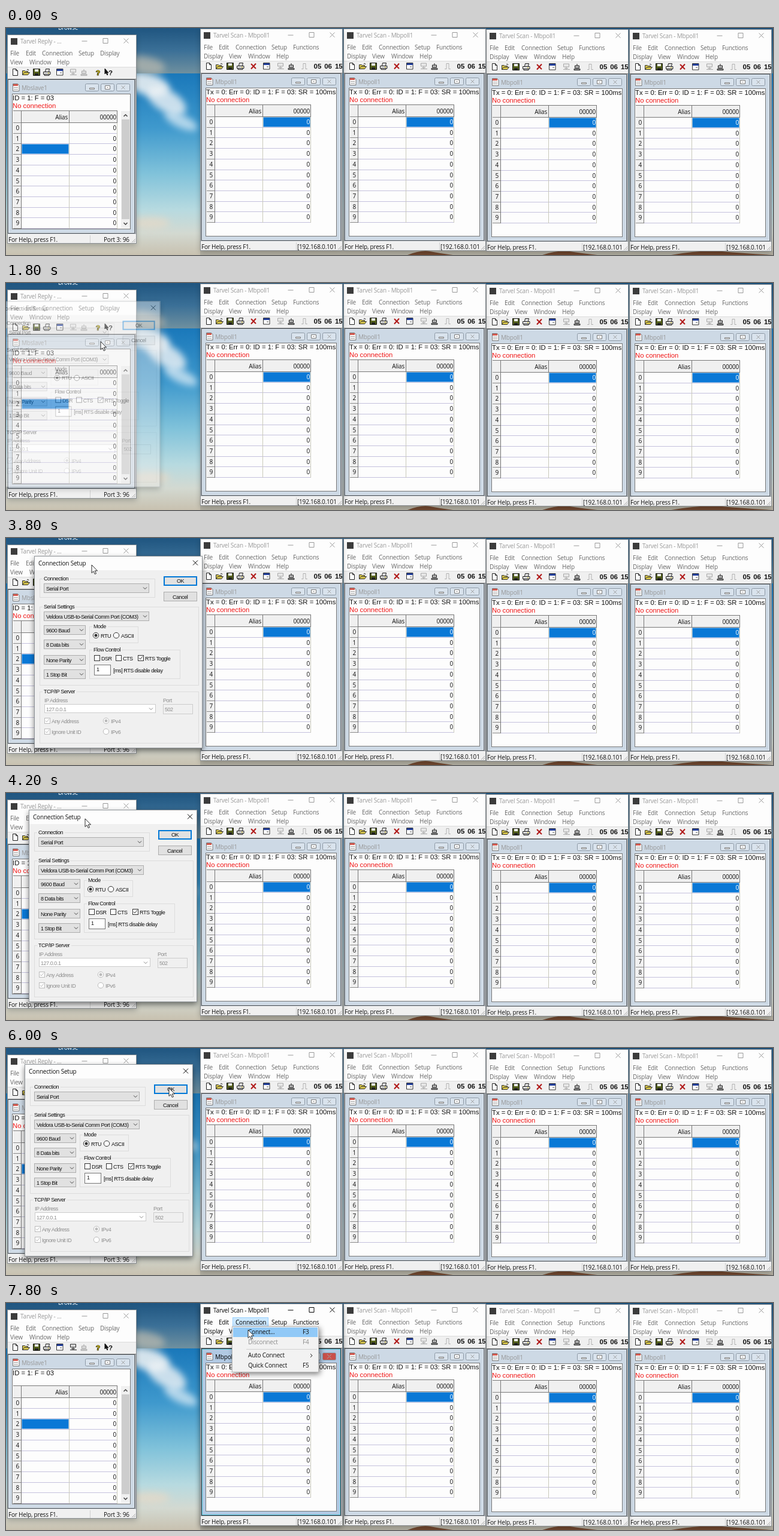
These frames come from a looping animation (1280x380 px, 8000 ms). An HTML page:

```html
<!DOCTYPE html>
<html lang="en">
<head>
<meta charset="utf-8">
<title>Serial connection setup</title>
<style>
  html, body { margin: 0; width: 100%; height: 100%; overflow: hidden; background: #4d7f92; }
  svg { display: block; }
  text { font: 10px "Open Sans", "Noto Sans", sans-serif; letter-spacing: -.2px; fill: #111; white-space: pre; }
  .arial, .red { font: 11.3px "Liberation Sans", Arial, sans-serif; letter-spacing: 0; }
  .red { fill: #f01414; }
  .bold { font: bold 11.5px "Liberation Sans", Arial, sans-serif; letter-spacing: 0; }
  .gold { fill: #d9c200; stroke: #111; stroke-width: 1.2; paint-order: stroke; }
  .dlg { font: 9px "Liberation Sans", Arial, sans-serif; letter-spacing: -.45px; }
  .dim { fill: #8c8c8c; }
  .white { fill: #fff; }
  .end { text-anchor: end; }
  .cap { fill: #999; }
  .bar { fill: #686868; }
  .ctl { stroke: #999; fill: none; }
  .on .cap, .on .bar { fill: #000; }
  .on .ctl { stroke: #000; }
  .shade { filter: blur(5px); opacity: .22; }
  .on > .shade, #dialog > .shade { opacity: .5; }
  .frame { fill: #cdd9e5; stroke: #5d666e; }
  .rim { fill: none; stroke: #e6eef6; }
  .on .frame { fill: #b1c9e3; stroke: #26343f; }
  .on .rim { stroke: #68d5e8; }
  .x { fill: #d9e3ed; }
  .on .x { fill: #c9504a; }
  .off, .net { opacity: .35; }
  .linked .net { opacity: 1; }
  .linked .red { display: none; }
  .combo { fill: #e1e1e1; stroke: #adadad; }
  .hover { fill: #dcecf9; stroke: #6aa9de; }
  .tab { fill: #cce8ff; stroke: #99d1ff; }
</style>
</head>
<body>
<script>
const LOOP = 8000, STEP = 200, PAPER = "#fdfdfd";
const rect = (x, y, w, h, fill, stroke = "none", more = "") =>
  `<rect x="${x}" y="${y}" width="${w}" height="${h}" fill="${fill}" stroke="${stroke}" ${more}/>`;
const box = (x, y, w, h, fill, stroke, more) => rect(x + .5, y + .5, w - 1, h - 1, fill, stroke, more);
const part = (x, y, w, h, cls) =>
  `<rect class="${cls}" x="${x + .5}" y="${y + .5}" width="${w - 1}" height="${h - 1}"/>`;
const path = (d, stroke = "#000", fill = "none", more = "") =>
  `<path d="${d}" stroke="${stroke}" fill="${fill}" ${more}/>`;
const text = (x, y, s, cls = "") => `<text x="${x}" y="${y}" class="${cls}">${s}</text>`;
const group = (x, y, body, more = "") => `<g transform="translate(${x} ${y})" ${more}>${body}</g>`;
const range = n => [...Array(n).keys()];

// Toolbar icons, about 13 by 12 pixels each
const icons = {
  new: path("M1.5.5h5l3 3v8h-8zM6.5.5v3h3", "#222", "#fff"),
  open: path("M.5 10.5v-7h4l1 1h4v2M.5 10.5l3-4h9l-3 4z", "#333", "#d8c64a") + path("M8 2q2-2 3 1", "#222"),
  save: path("M.5.5h11v11h-11z", "#111", "#54601c") + rect(3, 1, 6, 4, "#eee") + rect(3, 8, 6, 3, "#222"),
  print: path("M3.5 5l1-4.5h6l-1 4.5M.5 5.5h11.5v4h-11.5zM2 9.5h8v2h-8z", "#222", "#ddd") + rect(8, 7, 2, 1, "#c8b400"),
  cut: path("M1 2l8 8M9 1.5l-8 9", "#b01818", "none", 'stroke-width="2"'),
  win: path("M.5.5h10.5v10.5h-10.5z", "#333", "#fff") + rect(1, 1, 10, 3, "#24409c") + rect(6, 6, 3, 2, "#aaa"),
  net: path("M1.5 1h9v5h-9zM6 6v4M1 10.5h11M3 8.5h6", "#222", "#ddd"),
  dev: path("M2.5 4h7v4h-7zM6 1v3M1 9.5h10v2h-10z", "#222", "#bbb"),
  pulse: path("M0 10.5h3v-9h4v9h3", "#444"),
  help: text(1, 10.5, "?", "bold gold"),
  what: path("M1 0v9l2-2 2 4 1-1-2-3h3z", "#111", "#111") + text(7, 10.5, "?", "bold"),
};

function grid(x, y, selCol, selRow) {
  const rowY = i => Math.round(y + 21 + i * 17.7);
  let s = rect(x, y, 174, 21, "#f0f0f0") + rect(x, y, 14, 198, "#f0f0f0");
  for (const i of range(11)) {
    const ly = rowY(i) - .5;
    s += path(`M${x + 14} ${ly}h160`, i ? "#c4c1dd" : "#777") + path(`M${x} ${ly}h14`, "#8a8a8a");
  }
  s += path(`M${x + 93.5} ${y}v198M${x + 173.5} ${y}v198`, "#c9c9bb");
  s += path(`M${x + 13.5} ${y}v198M${x} ${y + .5}h174M${x + 93.5} ${y}v21M${x + 173.5} ${y}v21`, "#777");
  s += box(x + 14 + selCol * 80, rowY(selRow), 79, 17, "#0a78d6", "#8ebfe8", 'stroke-dasharray="1"');
  s += text(x + 91, y + 15, "Alias", "end") + text(x + 172, y + 15, "00000", "end");
  for (const i of range(10)) {
    const ty = y + 33 + i * 17.7;
    s += text(x + 4.5, ty, i) + text(x + 172, ty, 0, selCol && i === selRow ? "end white" : "end");
  }
  return s;
}

function child(w, h, title, info, sel) {
  const btn = (x, cls, mark) => `<rect x="${x + .5}" y="6.5" width="22" height="12" rx="2" class="${cls}" fill="#d9e3ed" stroke="#8d99a5"/>` +
    path(mark, cls ? "#fff" : "#777", cls ? "none" : "#fff", `transform="translate(${x + 11.5} 12.5)"`);
  return part(0, -1, w, h + 1, "frame") + part(1, 0, w - 2, h - 1, "rim") +
    path("M8.5 6.5h8l2.5 2.5v9.5h-10.5z", "#777", "#fff") + rect(9, 7, 8, 3, "#d65a50") + path("M10 12.5h7M10 15.5h7", "#999") +
    text(23, 17, title, "cap") +
    btn(w - 83, "", "M-4 1h8v2h-8z") + btn(w - 57, "", "M-4-3h8v6h-8zM-1 0h2") +
    btn(w - 31, "x", "M-3-3l6 6M3-3l-6 6") + path(`M${w - 22.5} 9.5l6 6m0-6l-6 6`, "#666", "none", 'opacity=".6"') +
    box(7, 23, w - 14, h - 30, PAPER, "#777") +
    text(8, 34, info, "arial") + text(8, 47, "No connection", "red") +
    `<svg x="8" y="24" width="${w - 16}" height="${h - 32}">${grid(1, 27, ...sel)}</svg>`;
}

function appWindow(o) {
  const { x, y, w, h } = o, cy = h - 16;
  const ctl = (cx, d) => `<path class="ctl" d="${d}" transform="translate(${cx} 10.5)"/>`;
  const body = rect(0, 0, w, h, "#f0f0f0") + rect(0, 0, w, 54, PAPER) +
    rect(6, 6, 11, 11, "#3c3c3c") + text(22, 15, o.title, "cap") +
    ctl(w - 87, "M-4.5.5h9") + ctl(w - 52, "M-4-4h8v8h-8z") + ctl(w - 17.5, "M-4-4l8 8M4-4l-8 8") +
    `<rect class="tab" x="${o.menu[2][0] - 4.5}" y="23.5" width="59" height="15" visibility="hidden"/>` +
    o.menu.map(([mx, s], i) => text(mx, i < 5 ? 34.5 : 49.5, s, "bar")).join("") +
    path(`M0 54.5h${w}`, "#dcdcdc") +
    o.tools.map(([tx, k, c = k]) => group(tx, 57, icons[k], `class="${c}"`)).join("") +
    rect(0, 74, w, cy - 74, "#a4a8ac") + path(`M0 74.5h${w}`, "#777") +
    group(o.inset, 76, child(...o.child)) + o.extra +
    rect(0, cy, w, 16, "#f0f0f0") + path(`M0 ${cy + .5}h${w}`, "#fafafa") +
    text(2, h - 3, "For Help, press F1.") + path(`M${w - 77.5} ${cy + 2}v13`, "#d0d0d0") +
    text(w - o.portGap, h - 3, o.port) +
    path(`M${w - 8} ${h - 2}l6-6M${w - 5} ${h - 2}l3-3`, "#aaa") + box(0, 0, w, h, "none", "#8b9094");
  return `<g id="${o.id}"><rect class="shade" x="${x}" y="${y + 3}" width="${w}" height="${h}"/>` +
    `<svg x="${x}" y="${y}" width="${w}" height="${h}">${body}</svg></g>`;
}

const poll = i => appWindow({
  id: "poll" + i, x: Math.round(324 + i * 238.6), y: i < 2 ? 1 : 2, w: 238, h: 372,
  title: "Tarvel Scan - Mbpoll1", inset: 2, port: "[192.168.0.101", portGap: 76,
  menu: [[6, "File"], [31, "Edit"], [59, "Connection"], [119, "Setup"], [155, "Functions"],
    [6, "Display"], [48, "View"], [80, "Window"], [127, "Help"]],
  tools: [[9, "new"], [26, "open"], [44, "save"], [61, "print"], [84, "cut"], [105, "win"],
    [128, "net"], [146, "dev"], [169, "pulse", "off"]],
  extra: ["05", "06", "15"].map((s, k) => text(189.5 + k * 17.7, 67, s, "bold")).join(""),
  child: [233, 279, "Mbpoll1", "Tx = 0: Err = 0: ID = 1: F = 03: SR = 100ms", [1, 0]],
});

const scrollbar = rect(0, 0, 15, 196, "#f0f0f0") + rect(1, 14, 13, 167, "#cdcdcd") +
  path("M4.5 9l3-3 3 3M4.5 187l3 3 3-3", "#444", "none", 'stroke-width="1.5"');
const slave = appWindow({
  id: "slave", x: 2, y: 11, w: 216, h: 350,
  title: "Tarvel Reply - ...", inset: 1, port: "Port 3: 96", portGap: 55,
  menu: [[5, "File"], [31, "Edit"], [58, "Connection"], [119, "Setup"], [155, "Display"],
    [5, "View"], [37, "Window"], [83, "Help"]],
  tools: [[8, "new"], [25, "open"], [43, "save"], [60, "print"], [82, "win"], [104, "net"],
    [122, "dev", "off"], [147, "help"], [162, "what"]],
  extra: group(190, 128, scrollbar),
  child: [212, 257, "Mbslave1", "ID = 1: F = 03", [0, 2]],
});

const menu = (id, x, y) => group(x, y,
  '<rect class="shade" x="3" y="3" width="144" height="77" style="opacity:.5"/>' +
  box(0, 0, 145, 77, "#f2f2f2", "#bbb") + `<rect class="pick" x="2" y="2" width="141" height="16" fill="#91c9f7"/>` +
  [["Connect...", "F3", 13], ["Disconnect", "F4", 30, "dim"], ["Auto Connect", "", 52], ["Quick Connect", "F5", 69]]
    .map(([s, key, ty, c]) => text(27, ty, s, c) + text(118, ty, key, c)).join("") +
  path("M24 38.5h118", "#d0d0d0") + path("M131 46l3 3-3 3", "#222"), `id="${id}"`);

function dialogBody() {
  const grey = "#bbb", ink = "#333";
  const label = (x, y, s, c = "") => text(x, y, s, "dlg " + c);
  const frame = (x, y, w, h, s, gap) => box(x, y, w, h, "none", "#dcdcdc") + rect(x + 5, y - 1, gap, 4, "#f0f0f0") + label(x + 7, y + 3, s);
  const combo = (y, w, s) => part(16, y, w, 16, "combo") + label(20, y + 11.5, s) +
    path(`M${w + 6} ${y + 6.5}l3 3 3-3`, "#444");
  const check = (x, y, s, on, c = ink) => box(x, y, 10, 10, "#fff", c) +
    (on ? path(`M${x + 2} ${y + 5}l2 2 4-5`, c) : "") + label(x + 12, y + 9, s, c === ink ? "" : "dim");
  const radio = (x, y, s, on, c = ink) => `<circle cx="${x}" cy="${y}" r="4.7" fill="#fff" stroke="${c}"/>` +
    (on ? `<circle cx="${x}" cy="${y}" r="2.5" fill="${c}"/>` : "") + label(x + 8, y + 3.5, s, c === ink ? "" : "dim");
  return '<rect class="shade" x="0" y="4" width="281" height="322"/>' +
    rect(0, 0, 281, 322, "#f0f0f0") + rect(0, 0, 281, 24, PAPER) + box(0, 0, 281, 322, "none", "#8f9498") +
    text(7, 16, "Connection Setup") + path("M265 7.5l8 8M273 7.5l-8 8") +
    frame(9, 38, 193, 32, "Connection", 46) + combo(46, 176, "Serial Port") +
    rect(217, 35, 54, 14, "#e1e1e1", "#0078d7", 'stroke-width="2"') + label(238, 45, "OK") +
    box(216, 60, 56, 16, "#e1e1e1", "#adadad") + label(231, 71.5, "Cancel") +
    frame(9, 85, 266, 132, "Serial Settings", 55) +
    combo(93, 176, "Veldora USB-to-Serial Comm Port (COM3)") +
    combo(116, 70, "9600 Baud") + combo(140, 70, "8 Data bits") + combo(166, 70, "None Parity") + combo(190, 70, "1 Stop Bit") +
    frame(92, 118, 82, 28, "Mode", 26) + radio(103, 133, "RTU", 1) + radio(137, 133, "ASCII") +
    frame(92, 157, 152, 49, "Flow Control", 48) +
    check(100, 166, "DSR") + check(136, 166, "CTS") + check(173, 166, "RTS Toggle", 1) +
    box(100, 182, 28, 18, "#fff", "#777") + label(104, 193, "1") + label(132, 195, "[ms] RTS disable delay") +
    frame(9, 227, 266, 87, "TCP/IP Server", 57) +
    label(17, 245, "IP Address", "dim") + box(17, 248, 186, 15, "#fff", "#ccc") + label(20, 259.5, "127.0.0.1", "dim") +
    path("M192 254.5l3 3 3-3", "#888") +
    label(215, 245, "Port", "dim") + box(215, 248, 50, 17, "#f0f0f0", "#ccc") + label(218, 259.5, "502", "dim") +
    check(17, 271, "Any Address", 1, grey) + check(17, 289, "Ignore Unit ID", 1, grey) +
    radio(120, 276, "IPv4", 1, grey) + radio(120, 294, "IPv6", 0, grey);
}

const ramp = (id, stops) => `<linearGradient id="${id}" x2="0" y2="1">` +
  stops.map(([o, c]) => `<stop offset="${o}" stop-color="${c}"/>`).join("") + "</linearGradient>";
const cloud = (x, y, rx, ry, fill, a, tilt = 0) =>
  `<ellipse rx="${rx}" ry="${ry}" fill="${fill}" opacity="${a}" transform="translate(${x} ${y}) rotate(${tilt})" style="filter:blur(6px)"/>`;
const wallpaper = `<defs>${ramp("dusk", [[0, "#1f5580"], [.5, "#3b7097"], [1, "#6f909f"]])}
  ${ramp("sky", [[0, "#1a78ba"], [.3, "#3f99cd"], [.55, "#80c2da"], [.75, "#b7dae0"], [.88, "#d3d9d1"], [1, "#c8c1b0"]])}</defs>` +
  rect(0, 76, 1280, 304, "url(#sky)") +
  cloud(236, 94, 38, 18, "#f4f5f5", .85, 15) + cloud(268, 122, 36, 18, "#f1f4f6", .8, 30) +
  cloud(292, 156, 30, 11, "#fff", .6, 25) + cloud(240, 326, 34, 10, "#ecd9c4", .6) +
  rect(0, 0, 1280, 76, "url(#dusk)") + cloud(232, 62, 34, 14, "#c3bfb2", .65, 10) +
  text(87, 3, "Browse", "white") + rect(324, 373, 956, 7, "#b3b0a3") +
  [[670, 76], [895, 92], [1110, 170]].map(([x, w]) => path(`M${x} 380q${w * .3}-9 ${w * .5}-6t${w * .5} 6z`, "none", "#70472f")).join("");

document.body.innerHTML = `<svg width="1280" height="380" viewBox="0 0 1280 380">${wallpaper}` +
  range(4).reverse().map(poll).join("") + slave + menu("slaveMenu", 55, 49) + menu("pollMenu", 377, 39) +
  `<g id="dialog">${dialogBody()}</g>` +
  `<path id="cursor" d="M0 0v13.5l3-2.800 2.300 4.800 2.200-1-2.300-4.600h4.300z" fill="#fff" stroke="#111" stroke-width=".9"/></svg>`;

const $ = id => document.getElementById(id);
const combos = document.querySelectorAll(".combo");
const tabs = ["slave", "poll0"].map(id => $(id).querySelector(".tab"));

// Rows: time, x, y
const cursorPath = [[200, 62, 366], [600, 92, 130], [800, 90, 40], [1000, 92, 43], [1400, 98, 58], [1600, 120, 68],
  [1800, 158, 98], [2400, 108, 122], [2800, 97, 123], [3200, 94, 86], [3600, 77, 40], [3800, 143, 45],
  [4400, 127, 42], [4800, 88, 152], [5200, 85, 213], [5600, 158, 160], [6000, 272, 67], [6200, 276, 66],
  [6800, 390, 58], [7200, 402, 36], [7600, 404, 33], [7800, 404, 45]];
const dialogPath = [[1800, -19, 25], [3600, -19, 25], [3800, 47, 30], [4000, 44, 29], [4400, 31, 27]];
// Rows: combo index, hover start, hover end
const hovers = [[1, 2400, 3200], [2, 4600, 5400], [3, 4800, 5600], [4, 5000, 5800]];

function along(rows, t) {
  const i = rows.findIndex(r => r[0] > t);
  if (i < 0) return rows[rows.length - 1].slice(1);
  if (!i) return rows[0].slice(1);
  const [a, b] = [rows[i - 1], rows[i]], k = (t - a[0]) / (b[0] - a[0]);
  return [1, 2].map(n => Math.round(a[n] + (b[n] - a[n]) * k));
}
const within = (t, a, b) => t >= a && t < b;
const show = (el, on) => el.setAttribute("visibility", on ? "visible" : "hidden");

function draw(t) {
  const slaveMenu = within(t, 1000, 1600), pollMenu = t >= 7600;
  $("slave").classList.toggle("on", within(t, 800, 1800) || within(t, 6400, 7400));
  $("slave").classList.toggle("linked", t >= 6400);
  $("poll0").classList.toggle("on", t >= 7400);
  show($("slaveMenu"), slaveMenu);
  show($("pollMenu"), pollMenu);
  show(tabs[0], slaveMenu);
  show(tabs[1], pollMenu);
  $("slaveMenu").querySelector(".pick").style.opacity = +(t >= 1200);
  $("pollMenu").querySelector(".pick").style.opacity = +(t >= 7800);

  const fading = t === 1800 || t === 6200, [x, y] = along(dialogPath, t);
  show($("dialog"), within(t, 1800, 6400));
  $("dialog").style.opacity = fading ? .4 : 1;
  $("dialog").setAttribute("transform", `translate(${x} ${y})` +
    (fading ? " translate(140.5 161) scale(.967) translate(-140.5 -161)" : ""));
  for (const [i, a, b] of hovers) combos[i].classList.toggle("hover", within(t, a, b));

  show($("cursor"), t >= 200);
  $("cursor").setAttribute("transform", `translate(${along(cursorPath, t).join(" ")})`);
}

const start = performance.now();
function tick() {
  const t = (performance.now() - start) % LOOP;
  draw(Math.floor(t / STEP) * STEP);
  requestAnimationFrame(tick);
}
tick();
</script>
</body>
</html>
```
